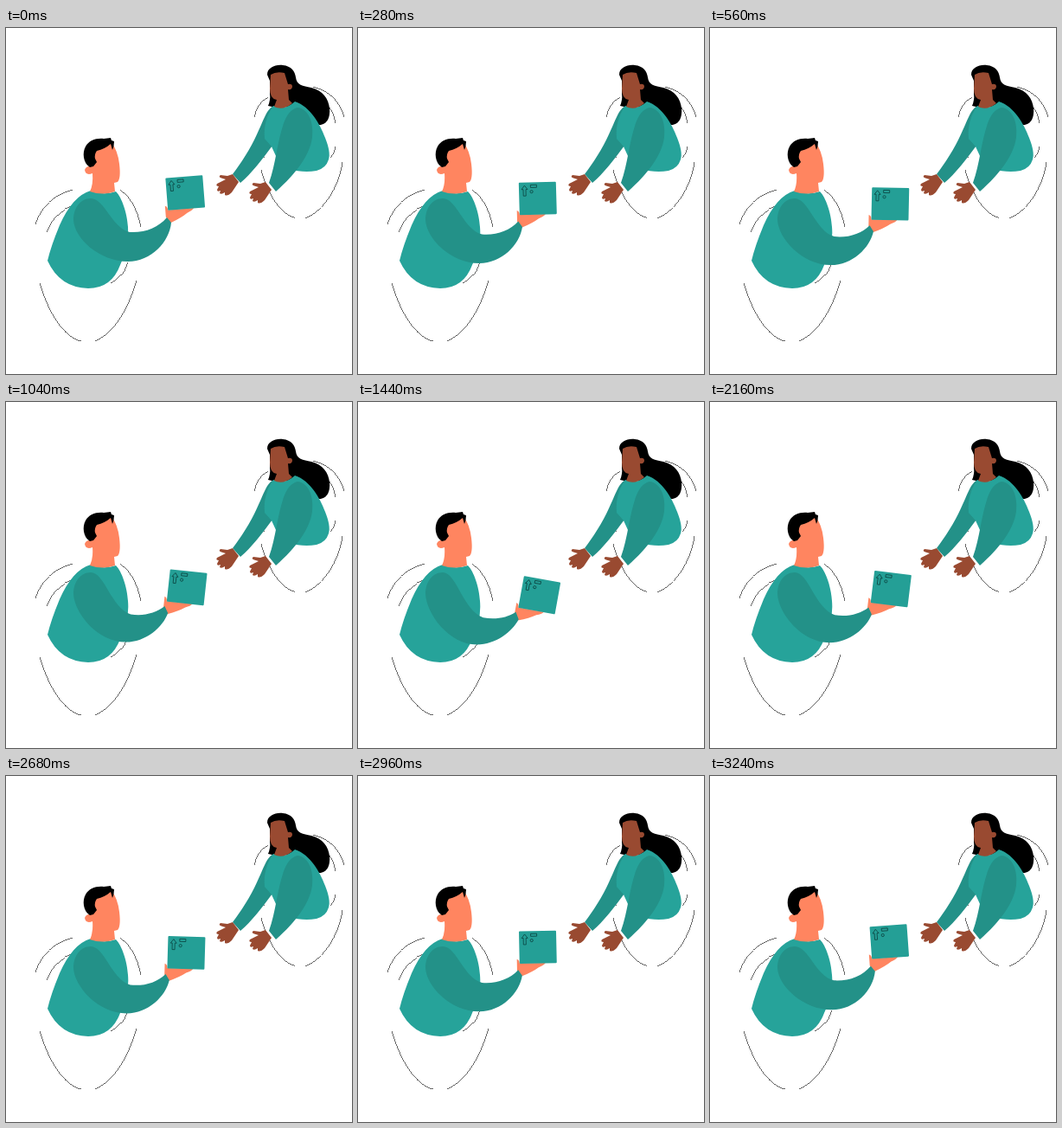
Write an HTML page that moves like this. It is 400 by 400 pixels and loops after 3.28 s.

```html
<!DOCTYPE html>
<html lang="en">
<head>
<meta charset="utf-8">
<title>Handing over a parcel</title>
<style>
  html, body { margin: 0; width: 100%; height: 100%; overflow: hidden; background: #fff; }
  svg { display: block; width: 100%; height: 100%; }
  .line { fill: none; stroke: #000; stroke-width: .6; shape-rendering: crispEdges; }
  .icon { fill: none; stroke: #0b4340; stroke-width: .8; }
  .light { fill: #26a39a; }
  .dark { fill: #239188; }
  .brown { fill: #994a31; }
  .skin { fill: #ff8560; }
</style>
</head>
<body>
<svg viewBox="0 0 400 400">
  <!-- loose outlines around both figures -->
  <path class="line" d="M34 227Q44 196 77 187M47 236Q56 212 79 204M132 187Q150 199 156 230M121 295Q136 287 141 271
    M39 295C49 329 67 358 87 362M103 362C126 352 141 325 151 292
    M287 103Q290 87 303 80M355 68Q383 75 391 103M365 82Q379 94 381 110M292 136Q294 145 299 150M381 137Q380 145 375 150
    M295 164C302 190 315 213 334 220M346 220C367 212 385 184 389 155"/>

  <!-- woman -->
  <path d="M302 54C302 46 311 42 320 43C330 44 334 50 335 57C336 66 343 67 353 69C366 72 373 82 374 93C375 102 372 112 362 112C353 110 346 99 337 90L312 92L303 90Q306 83 305 76L305 61Z"/>
  <path class="dark" d="M310 90C301 93 298 107 290 123C283 139 271 157 262 169L271 179C284 168 296 152 308 136Z"/>
  <path class="light" d="M309 90Q322 96 334 85C352 91 363 111 369 127C373 137 375 146 373 152Q370 162 359 165C348 167 338 166 327 163L312 148L307 137L299 128Q297 107 309 90Z"/>
  <path class="brown" d="M306 54Q312 50 322 52L326 65Q331 64 331 68Q330 72 326 71L327 83L331 87Q320 96 310 91L313 83Q305 82 305 70Z"/>
  <path class="dark" d="M337 92C349 93 356 108 354 126C352 146 335 169 312 189L304 179C312 157 313 134 321 110Q327 94 337 92Z"/>
  <path id="palm" class="brown" d="M262 169L256 171L248 170Q245 172 249 173.500L254 175L244 180Q242 183 246 183L244 187Q244 190 248 188L247 191Q249 193 253 190L253 193Q256 195 261 190L269 178Z"/>
  <use href="#palm" transform="translate(38 9)"/>

  <!-- man -->
  <path class="light" d="M98 188Q112 194 127 189C134 196 140 214 141 230Q143 252 132 274Q122 301 95 301Q62 300 48 269Q52 252 62 228Q77 194 98 188Z"/>
  <path class="skin" d="M104 138L122 133Q129 141 131 157Q133 174 129 178L125 179L126 189Q112 194 97 189Q101 181 100 168Q92 171 91 164Q93 159 99 160Z"/>
  <path d="M97 161C89 156 88 144 92 137C96 130 104 127 113 128L121 127L122 130L125 131Q125 137 123 141L121 134Q114 140 105 142Q102 146 103 151L105 155L101 160Z"/>
  <g id="load">
    <path class="skin" d="M-3 32Q0 33 0 37L30 37Q28 40 22 42Q15 47 2 52L-3 45Z"/>
    <rect width="43" height="37.5" rx="1" fill="#249f96"/>
    <path class="icon" d="M6.500 3.500L10 8H8V15.500H5V8H3ZM13.500 3H20.500V6H13.500Z"/>
    <circle class="icon" cx="14.500" cy="10.800" r="1.600"/>
  </g>
  <path id="sleeve" class="dark"/>
</svg>
<script>
  const LOOP = 3280, STEP = 40;
  const raised = "M186 219C176 231 160 237 143 236C122 231 114 197 98 197C86 197 78 208 78 222C79 243 108 270 141 270C168 270 189 247 191 225Z";
  const lowered = "M182 246C172 252 158 254 145 251C121 242 114 197 98 197C86 197 78 208 78 222C79 244 104 282 137 282C158 282 177 268 185 255Z";
  const load = document.getElementById("load");
  const sleeve = document.getElementById("sleeve");
  const start = performance.now();

  const mix = (a, b, k) => a + (b - a) * k;

  function mixPath(a, b, k) {
    const ends = b.match(/\d+/g);
    let i = 0;
    return a.replace(/\d+/g, n => mix(+n, +ends[i++], k).toFixed(2));
  }

  function draw(now) {
    const elapsed = Math.max(0, now - start);
    const t = Math.floor(elapsed % LOOP / STEP) * STEP;
    const k = 1 - Math.abs(1 - 2 * t / LOOP); // steady down, steady back up
    sleeve.setAttribute("d", mixPath(raised, lowered, k));
    load.setAttribute("transform",
      `translate(${mix(184.3, 193, k)} ${mix(173.5, 204.8, k)}) rotate(${mix(-4.5, 12.3, k)})`);
    requestAnimationFrame(draw);
  }

  draw(start);
</script>
</body>
</html>
```
